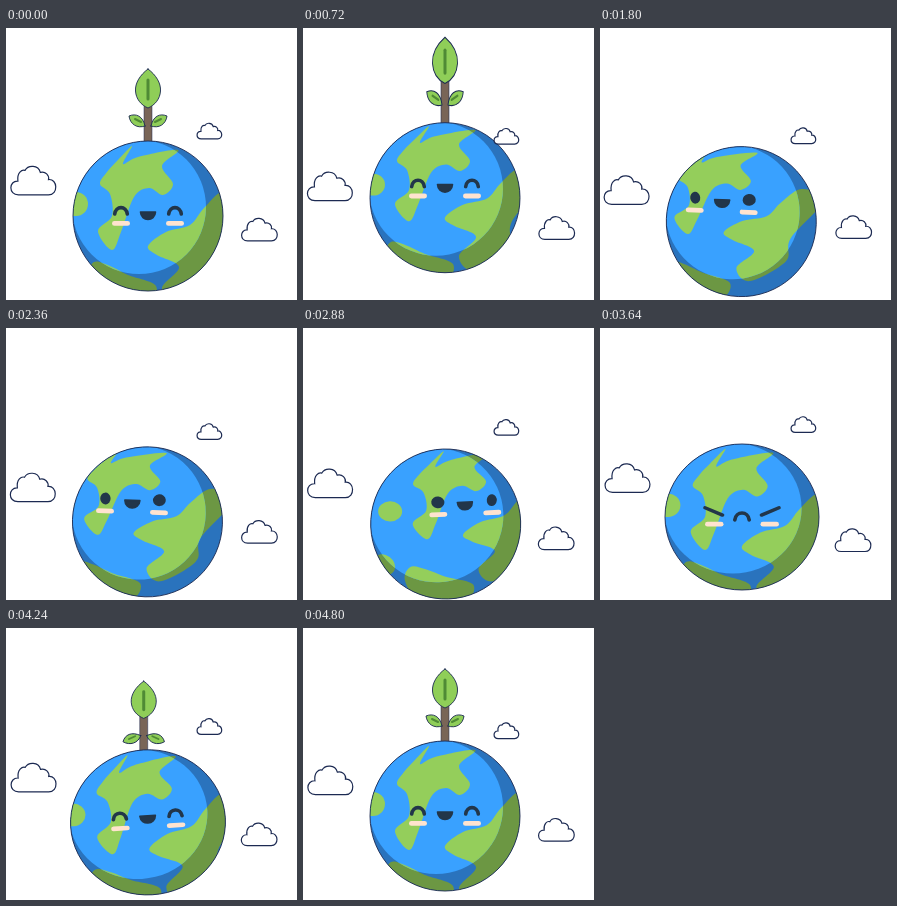
These frames come from a looping animation (291 px wide and 272 px high, 4.84 s). An HTML page with a canvas:

```html
<!DOCTYPE html>
<html lang="en">
<head>
<meta charset="utf-8">
<title>Little Earth</title>
<style>
html, body { margin: 0; width: 100%; height: 100%; overflow: hidden; background: #fff; }
canvas { display: block; width: 291px; height: 272px; }
</style>
</head>
<body>
<canvas id="stage"></canvas>
<script>
const LOOP = 4840, W = 291, H = 272, R = 75, TAU = Math.PI * 2;
const EDGE = '#1c2a52', INK = '#22364a';
const canvas = document.getElementById('stage');
const ctx = canvas.getContext('2d');
const dpr = window.devicePixelRatio || 1;
canvas.width = W * dpr;
canvas.height = H * dpr;

// Smooth step from 0 at a to 1 at b
function ease(t, a, b) {
  const u = Math.min(1, Math.max(0, (t - a) / (b - a)));
  return u * u * (3 - 2 * u);
}

// Rises from a to b, falls back by c
const pulse = (t, a, b, c) => ease(t, a, b) - ease(t, b, c);

function pose(t) {
  const hop = pulse(t, 560, 800, 1000) + pulse(t, 3880, 4050, 4190);
  const land = pulse(t, 840, 1000, 1160) + pulse(t, 4050, 4190, 4460);
  const crouch = pulse(t, 3640, 3880, 4040);
  const strain = pulse(t, 3360, 3540, 4040) + pulse(t, 3540, 3790, 4040) * 0.3;
  const back = ease(t, 3320, 3560);
  const away = ease(t, 1080, 1400) - back;
  const turn = 2 * ease(t, 2280, 2680) - ease(t, 1080, 1480) - back;
  const squash = 2 * strain + 2 * crouch + 2.7 * land;
  return {
    turn,
    y: 188 - 24.5 * hop + 7 * land + 9 * crouch + strain + 6.8 * away + 1.2 * turn,
    rx: R + squash,
    ry: R - squash,
    rot: -0.04 * turn - 0.065 * land,
    lift: 0.72 * hop + 0.18 * land + away,
    grow: 1 - ease(t, 840, 1040) + ease(t, 3920, 4040),
    tall: 1 + 0.25 * hop - 0.05 * land,
    droop: land - 0.1 * hop,
    mood: t < 980 || t >= 3980 ? 'happy' : t < 3420 ? 'open' : 'angry'
  };
}

// Closed smooth curve through points
function blob(...p) {
  const path = new Path2D(), n = p.length / 2;
  const x = i => p[((i + n) % n) * 2], y = i => p[((i + n) % n) * 2 + 1];
  path.moveTo(x(0), y(0));
  for (let i = 0; i < n; i++) {
    path.bezierCurveTo(
      x(i) + (x(i + 1) - x(i - 1)) / 6, y(i) + (y(i + 1) - y(i - 1)) / 6,
      x(i + 1) - (x(i + 2) - x(i)) / 6, y(i + 1) - (y(i + 2) - y(i)) / 6,
      x(i + 1), y(i + 1));
  }
  return path;
}

const north = blob(106, 222, 92, 203, 106, 188, 104, 166, 94, 156, 101, 144, 111, 133, 126, 118,
  117, 136, 132, 129, 172, 122, 156, 138, 167, 156, 157, 167, 143, 160, 128, 169, 115, 204);
const south = blob(142, 218, 160, 204, 184, 197, 198, 180, 218, 163, 240, 176,
  209, 222, 205, 250, 170, 275, 156, 260, 173, 239, 151, 227);
const polar = blob(88, 234, 104, 238, 122, 247, 150, 258, 140, 278, 96, 272, 82, 250);
const cloud = new Path2D('M7.5 28C-2.5 28-2 14 7 14.5C6 6 11 3 14 4C17-1.5 27-1.5 29 6C34 4.5 38 9 37 13C46 12 47 28 37 28Z');
const leaf = new Path2D('M0-72C8-66 13-58 12.5-50C12-42 7-36 0-33C-7-36-12-42-12.5-50C-13-58-8-66 0-72Z');
const sideLeaf = new Path2D('M0 0C2-10 9-13 16-10C15-2 8 3 0 0Z');

function line(color, width, x1, y1, x2, y2) {
  ctx.strokeStyle = color;
  ctx.lineWidth = width;
  ctx.lineCap = 'round';
  ctx.beginPath();
  ctx.moveTo(x1, y1);
  ctx.lineTo(x2, y2);
  ctx.stroke();
}

function shape(path, fill, width = 0.9) {
  ctx.fillStyle = fill;
  ctx.fill(path);
  ctx.strokeStyle = EDGE;
  ctx.lineWidth = width;
  ctx.stroke(path);
}

function oval(x, y, rx, ry, tilt = 0) {
  ctx.beginPath();
  ctx.ellipse(x, y, rx, ry, tilt, 0, TAU);
}

function arch(w, rise) {
  ctx.lineWidth = 3.6;
  ctx.beginPath();
  ctx.moveTo(-w, 3);
  ctx.bezierCurveTo(-w * 0.85, rise, w * 0.85, rise, w, 3);
  ctx.stroke();
}

function drawCloud(x, y, s) {
  ctx.save();
  ctx.translate(x, y);
  ctx.scale(s, s);
  shape(cloud, '#fff', 1.2 / s);
  ctx.restore();
}

function drawPlant(s) {
  if (s.grow < 0.02) return;
  ctx.save();
  ctx.translate(0, -s.ry);
  ctx.rotate(-s.rot);
  ctx.scale(s.grow, s.grow * s.tall);
  ctx.fillStyle = '#796557';
  ctx.fillRect(-4, -36, 8, 42);
  for (const side of [-1, 1]) {
    line(EDGE, 0.5, side * 4, -35, side * 4, 3);
    ctx.save();
    ctx.scale(side, 1);
    ctx.translate(3, -15);
    ctx.rotate(s.droop);
    shape(sideLeaf, '#8fce58');
    line('#4f8a35', 2, 4, -4, 10, -7);
    ctx.restore();
  }
  shape(leaf, '#8fce58');
  line('#4f8a35', 3, 0, -61, 0, -42);
  ctx.restore();
}

// Looking up flattens the land and slides it, as on a turning ball.
function drawMap(s, sea, land) {
  const k = s.lift;
  ctx.fillStyle = sea;
  ctx.fillRect(-90, -90, 180, 180);
  ctx.save();
  ctx.translate(17 * s.turn, -14 * k);
  ctx.scale(1, 1 - 0.16 * k);
  ctx.fillStyle = land;
  oval(-72, -12 + 11 * k, 12, 12);
  ctx.fill();
  ctx.translate(-142, -188);
  ctx.fill(north);
  ctx.fill(south);
  ctx.translate(0, 20 * k);
  ctx.fill(polar);
  oval(62, 230, 10, 13, -0.5);
  ctx.fill();
  ctx.restore();
}

function drawEye(side, mood, turn) {
  ctx.save();
  ctx.translate(side * 27, -5);
  if (mood === 'open') {
    oval(0, 0, 5.8 - side * turn * 0.8, 5.9, 0.15 * turn);
    ctx.fill();
  } else if (mood === 'angry') {
    line(INK, 3.6, side * 9, -4.5, side * -8, 3);
  } else {
    arch(6.3, -5.5);
  }
  ctx.fillStyle = '#ffe3cf';
  ctx.beginPath();
  ctx.roundRect(-9, 10, 18, 4.8, 2.4);
  ctx.fill();
  ctx.restore();
}

function drawFace(s) {
  ctx.save();
  ctx.translate(20 * s.turn, -17 * s.lift);
  ctx.strokeStyle = ctx.fillStyle = INK;
  ctx.lineJoin = ctx.lineCap = 'round';
  for (const side of [-1, 1]) drawEye(side, s.mood, s.turn);
  if (s.mood === 'angry') {
    arch(7, -6.5);
  } else {
    ctx.lineWidth = 1.6;
    ctx.beginPath();
    ctx.moveTo(-7.5, -4);
    ctx.lineTo(7.5, -4);
    ctx.bezierCurveTo(7, 6, -7, 6, -7.5, -4);
    ctx.fill();
    ctx.stroke();
  }
  ctx.restore();
}

function drawEarth(s) {
  ctx.save();
  ctx.translate(142 + 0.7 * s.turn, s.y);
  ctx.rotate(s.rot);
  drawPlant(s);
  ctx.scale(s.rx / R, s.ry / R);
  ctx.save();
  oval(0, 0, R, R);
  ctx.clip();
  drawMap(s, '#2a73bd', '#6c9743');
  oval(-9, -9, 67, 67);
  ctx.clip();
  drawMap(s, '#39a1ff', '#94ce5b');
  ctx.restore();
  oval(0, 0, R, R);
  ctx.strokeStyle = EDGE;
  ctx.lineWidth = 0.9;
  ctx.stroke();
  drawFace(s);
  ctx.restore();
}

function render(t) {
  const wave = (start, n = 1) => Math.sin(TAU * n * (t - start) / LOOP);
  ctx.setTransform(dpr, 0, 0, dpr, 0, 0);
  ctx.clearRect(0, 0, W, H);
  drawEarth(pose(t));
  drawCloud(4.5 - 0.5 * wave(400), 141.5 + 6.5 * wave(400), 1.02);
  drawCloud(191, 95.2 + 6.5 * wave(0), 0.56);
  // The second harmonic lingers low and rises late.
  drawCloud(235.5 + 0.4 * wave(0), 193 + 6.8 * wave(2250) + 2 * wave(2685, 2), 0.81);
}

function frame(now) {
  render(now % LOOP);
  requestAnimationFrame(frame);
}
requestAnimationFrame(frame);
</script>
</body>
</html>
```
